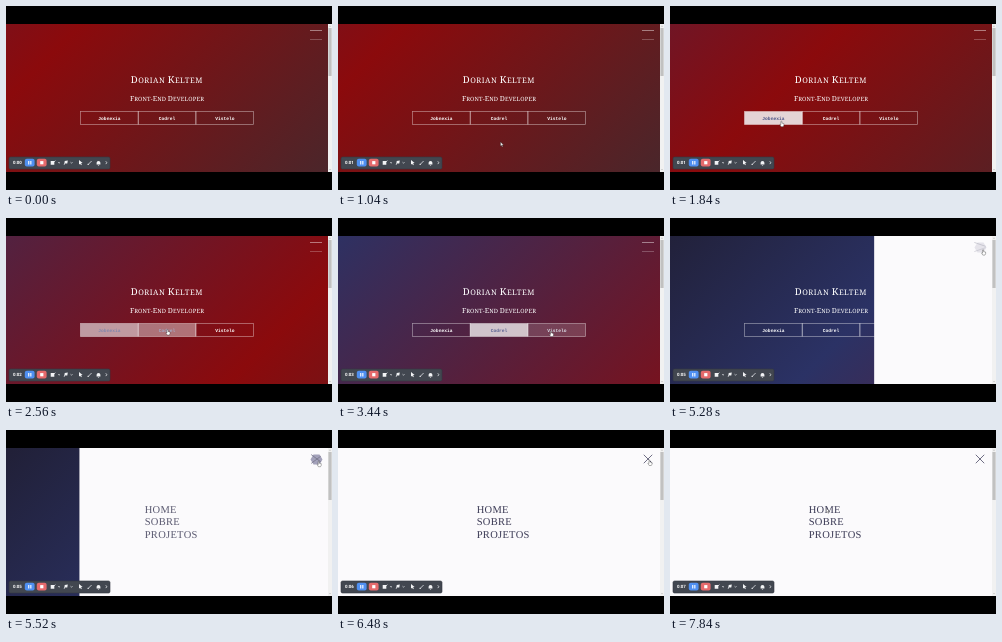
An HTML page for the animation above (8 s loop, 326x184 px).

```html
<!DOCTYPE html>
<html lang="en">
<head>
<meta charset="utf-8">
<title>Portfolio recording</title>
<style>
  html, body { margin: 0; width: 100%; height: 100%; overflow: hidden; background: #000; }
  svg { display: block; width: 100%; height: 100%; }
  text { text-rendering: geometricPrecision; }
  .heading { font-family: "Noto Serif", "Liberation Serif", serif; fill: #fff; text-anchor: middle; }
  .title { font-size: 7.6px; letter-spacing: .5px; }
  .title tspan { font-size: 9.5px; }
  .subtitle { font-size: 5.8px; letter-spacing: .15px; }
  .subtitle tspan { font-size: 7px; }
  .label { font: bold 4.6px "Liberation Mono", monospace; text-anchor: middle; }
  .nav { font: 10.5px "Liberation Serif", "Noto Serif", serif; letter-spacing: .3px; fill: #3b3a55; }
  .icon { fill: none; stroke: #e8eaee; stroke-width: .8; }
  .solid { fill: #f2f3f5; }
</style>
</head>
<body>
<svg viewBox="0 0 326 184" preserveAspectRatio="none">
  <defs>
    <linearGradient id="sky" gradientUnits="userSpaceOnUse">
      <stop offset=".18" stop-color="#212038"/>
      <stop offset=".3333" stop-color="#2b3265"/>
      <stop offset=".6667" stop-color="#8b0a0c"/>
      <stop offset="1" stop-color="#25363c"/>
    </linearGradient>
    <clipPath id="reveal"><rect id="revealBox" y="18" width="322" height="148"/></clipPath>
  </defs>

  <rect width="326" height="184"/>
  <rect y="18" width="322" height="148" fill="url(#sky)"/>

  <g class="heading">
    <text class="title" x="160.8" y="77.4"><tspan>D</tspan>ORIAN <tspan>K</tspan>ELTEM</text>
    <text class="subtitle" x="161" y="95.4"><tspan>F</tspan>RONT-<tspan>E</tspan>ND <tspan>D</tspan>EVELOPER</text>
  </g>
  <g id="buttons"></g>

  <g clip-path="url(#reveal)">
    <rect y="18" width="322" height="148" fill="#fbfafc"/>
    <g id="nav" class="nav">
      <text x="138.7" y="82.6">HOME</text>
      <text x="138.7" y="95.4">SOBRE</text>
      <text x="138.7" y="108.2">PROJETOS</text>
    </g>
  </g>

  <path id="blob" d="M304.5 29.5l3-5 6 0 3 5-3 5h-6z" fill="#8d8aa8"/>
  <g id="burger" stroke-width=".8">
    <path d="M-6 0H6"/><path d="M-6 0H6"/>
  </g>

  <g id="scrollbar">
    <rect x="322" y="18" width="4" height="148" fill="#f1f1f1"/>
    <rect x="322.4" y="22" width="3.2" height="48" fill="#c1c1c1"/>
    <path d="M323.2 20.6l.8-1 .8 1zM323.2 163.2l.8 1 .8-1z" fill="#a0a0a0"/>
  </g>

  <g id="recorder">
    <rect x="3" y="151" width="101" height="12" rx="1.5" fill="#424750" stroke="#343840" stroke-width=".6"/>
    <text id="timer" x="7" y="158.2" font-family="Roboto, sans-serif" font-size="4.4" font-weight="bold" fill="#fff"></text>
    <rect x="18.8" y="152.8" width="9.8" height="7.6" rx="2" fill="#4f8ff0"/>
    <path d="M22.2 155h1.1v3.4h-1.1zM24.3 155h1.1v3.4h-1.1z" fill="#fff"/>
    <rect x="30.8" y="152.8" width="9.8" height="7.6" rx="2" fill="#e56a6c"/>
    <rect x="34.2" y="155.1" width="3.2" height="3.2" fill="#fff"/>
    <path class="icon" d="M48 156l1.3-1.4M52.2 156.3l.9.9.9-.9M58.2 158.8l1-3.6M64.6 156.3l.9.9.9-.9M82 158.6l3.6-3.6M99.8 155.3l1 1.4-1 1.4"/>
    <path class="solid" d="M44.7 155h3.6v3.8h-3.6zM58.8 155l3-.4-.5 2.8h-2.2zM73 154l3.6 3.1-1.6.2.8 1.5-.8.4-.8-1.5-1.2.9zM81.6 159l.3-1.6 1.3 1.3zM90.6 158.6v-1.8a1.9 1.9 0 0 1 3.8 0v1.8zM91.7 159h1.6l-.8.7z"/>
  </g>

  <g id="cursor" stroke="#222" stroke-width=".35" fill="#fff" stroke-linejoin="round">
    <path id="arrow" d="M0 0V4l.9-.8.7 1.6.8-.4-.7-1.5H3z"/>
    <path id="hand" d="M0 .3q.5-.5 1 0V2l2 .4v1.8l-.7 1.3H.2L-1 3.6l.3-.6.7.5z"/>
  </g>
</svg>
<script>
const LOOP = 8000;
const $ = id => document.getElementById(id);
const clamp = v => Math.max(0, Math.min(1, v));
const mix = (a, b, k) => a + (b - a) * k;
const mixColor = (a, b, k) => `rgb(${a.map((v, i) => Math.round(mix(v, b[i], k)))})`;
const set = (el, attrs) => { for (const name in attrs) el.setAttribute(name, attrs[name]); };

// CSS "ease": cubic-bezier(.25, .1, .25, 1)
function ease(x) {
  x = clamp(x);
  let lo = 0, hi = 1, s;
  for (let i = 0; i < 24; i++) {
    s = (lo + hi) / 2;
    const px = .75 * s * (1 - s) + s ** 3;
    if (px < x) lo = s; else hi = s;
  }
  return .3 * s * (1 - s) ** 2 + 3 * s * s * (1 - s) + s ** 3;
}

const WHITE = [255, 255, 255], INK = [48, 58, 118], GREY = [85, 84, 110];

const buttons = [
  { name: 'Jobnexia', enter: 1.55, leave: 2.44 },
  { name: 'Codrel', enter: 2.43, leave: 3.36 },
  { name: 'Vistelo', enter: 3.37, leave: 4.36 }
];
buttons.forEach((button, i) => {
  const x = 74.5 + i * 57.7;
  $('buttons').insertAdjacentHTML('beforeend',
    `<rect x="${x}" y="105.5" width="57.7" height="13" stroke="#fff" stroke-opacity=".5" stroke-width=".7" fill="#f2f0f2"/>
     <text class="label" x="${x + 28.9}" y="114.1">${button.name}</text>`);
  [button.box, button.label] = [...$('buttons').children].slice(-2);
});

// time in seconds, x, y
const pointerPath = [
  [.4, 192, 148], [1.04, 162.5, 136], [1.65, 112, 116], [2.2, 108, 113],
  [2.56, 161, 111.5], [3.1, 166, 112], [3.44, 212.5, 113], [4.1, 221, 112],
  [4.48, 296.5, 34.5], [4.8, 313, 32], [6.48, 311, 30], [7.04, 226, 88],
  [7.36, 226, 88], [7.84, 156.5, 78.5]
];

function pointerAt(t) {
  const next = pointerPath.findIndex(p => p[0] > t);
  if (next < 1) return pointerPath.at(next).slice(1);
  const [a, b] = [pointerPath[next - 1], pointerPath[next]];
  const u = (t - a[0]) / (b[0] - a[0]), k = u * u * (3 - 2 * u);
  return [mix(a[1], b[1], k), mix(a[2], b[2], k)];
}

function drawSky(t) {
  const half = 7.5, since = t - 1;
  const shift = since < 0 ? ease(since / half + 1) : 1 - ease(since / half);
  const start = (18 - 222 - 966 * shift) / 2;
  set($('sky'), { x1: start, y1: start, x2: start + 940, y2: start + 940 });
}

function drawButtons(t) {
  for (const { box, label, enter, leave } of buttons) {
    const k = ease((t - enter) / .5) * (1 - ease((t - leave) / .5));
    set(box, { 'fill-opacity': k });
    set(label, { fill: mixColor(WHITE, INK, k) });
  }
}

function drawMenu(t) {
  const open = ease((t - 5.05) / 1);
  set($('revealBox'), { x: 322 * (1 - open) });
  set($('nav'), { opacity: mix(.3, 1, open) });

  const turn = ease((t - 5.05) / .9);
  set($('burger'), { stroke: mixColor(WHITE, GREY, turn) });
  [...$('burger').children].forEach((line, i) => {
    const side = i ? 1 : -1;
    set(line, {
      transform: `translate(310 ${29 + side * 4.5 * (1 - turn)}) rotate(${-side * 45 * turn})`,
      'stroke-opacity': mix(i ? .3 : .55, 1, turn)
    });
  });
  set($('blob'), { opacity: .8 * clamp(1 - Math.abs(t - 5.52) / .32) });
}

function drawPointer(t) {
  const [x, y] = pointerAt(t);
  const overButton = x > 74 && x < 248 && y > 106 && y < 119;
  const overBurger = x > 304 && y < 36;
  const hand = overButton || overBurger;
  set($('cursor'), { transform: `translate(${x} ${y})`, opacity: t < .4 ? 0 : 1 });
  set($('hand'), { opacity: hand ? 1 : 0 });
  set($('arrow'), { opacity: hand ? 0 : 1 });
}

function frame() {
  const t = performance.now() % LOOP / 1000;
  drawSky(t);
  drawButtons(t);
  drawMenu(t);
  drawPointer(t);
  $('timer').textContent = `0:0${Math.floor(t)}`;
  requestAnimationFrame(frame);
}
frame();
</script>
</body>
</html>
```
